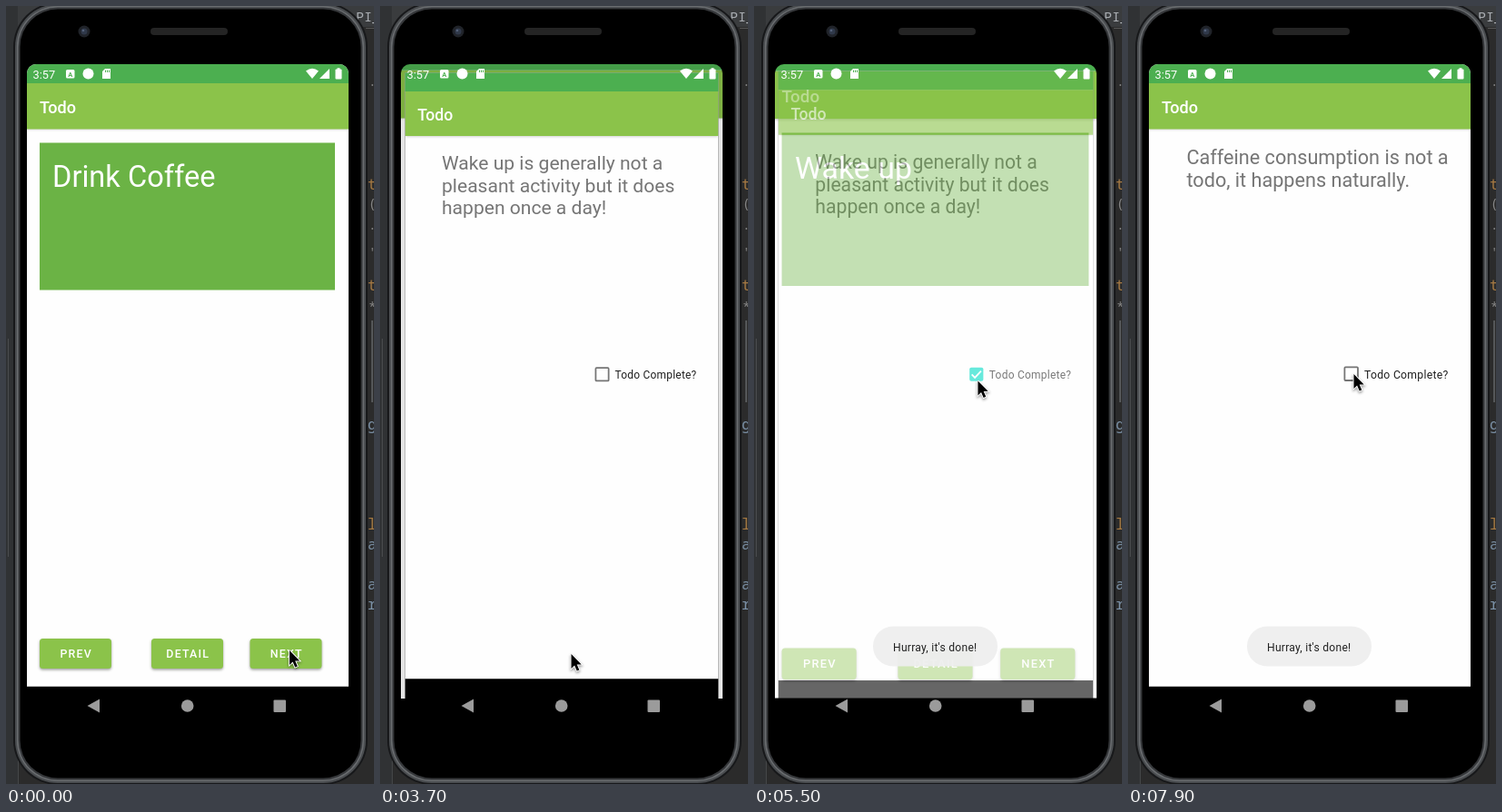
An HTML page with a canvas for the animation above (8000 ms loop, 405 px wide and 856 px high).

```html
<!DOCTYPE html>
<html lang="en">
<head>
<meta charset="utf-8">
<title>Todo app</title>
<style>
html, body { margin: 0; width: 100%; height: 100%; overflow: hidden; background: #2b2b2b; }
canvas { display: block; width: 405px; height: 856px; }
</style>
</head>
<body>
<canvas width="405" height="856"></canvas>
<script>
const LOOP = 8000, STEP = 100, OPEN_MS = 400;
const CENTER = [200, 427];
const BUTTONS = [['PREV', 37], ['DETAIL', 160], ['NEXT', 268.5]];
const TODOS = [[0, 'Drink Coffee'], [300, 'Eat Breakfast'], [800, 'Do Homework'],
  [1400, 'Go to sleep'], [2000, 'Wake up'], [6300, 'Drink Coffee']];
const WAKE = ['Wake up is generally not a', 'pleasant activity but it does', 'happen once a day!'];
const COFFEE = ['Caffeine consumption is not a', 'todo, it happens naturally.'];
// start, button index, hold time
const PRESSES = [[100, 2, 300], [800, 2, 100], [1400, 2, 100], [2000, 2, 200],
  [3300, 1, 200], [6200, 2, 200], [7200, 1, 100]];
// start, true when the detail page opens
const TRANSITIONS = [[3585, true], [5445, false], [7300, true]];
const CHECK_AT = 5100, BACK_END = 5900;
const POINTER = [[0, 312, 709], [2700, 312, 709], [2800, 299, 711], [2900, 299, 711],
  [3300, 210.5, 713], [3900, 210.5, 713], [4700, 243.5, 399], [5400, 243.5, 399],
  [6200, 312, 711], [6500, 312, 711], [6800, 264.5, 712], [7000, 211, 718],
  [7400, 211, 718], [7900, 248.5, 405], [8000, 248.5, 405]];

const canvas = document.querySelector('canvas');
const sheet = canvas.cloneNode();
let ctx = canvas.getContext('2d');
const clamp = v => Math.max(0, Math.min(1, v));
const mix = (a, b, p) => a + (b - a) * p;
const latest = (list, t) => list.filter(item => item[0] <= t).pop();

function cubic(a, b, c, d, u) {
  const v = 1 - u;
  return a * v * v * v + 3 * b * v * v * u + 3 * c * v * u * u + d * u * u * u;
}

// Two-part curve: quick start, very slow settle
function settle(x) {
  const [xs, ys] = x < 1 / 6
    ? [[0, .05, .1333, 1 / 6], [0, 0, .06, .4]]
    : [[1 / 6, .2083, .25, 1], [.4, .82, 1, 1]];
  let lo = 0, hi = 1;
  for (let i = 0; i < 20; i++) {
    const mid = (lo + hi) / 2;
    if (cubic(...xs, mid) < x) lo = mid; else hi = mid;
  }
  return cubic(...ys, lo);
}

function group(draw) {
  ctx.save();
  draw();
  ctx.restore();
}

function rect(x, y, w, h, color, r = 0) {
  ctx.fillStyle = color;
  ctx.beginPath();
  ctx.roundRect(x, y, w, h, r);
  ctx.fill();
}

function disc(x, y, r, color) {
  ctx.fillStyle = color;
  ctx.beginPath();
  ctx.arc(x, y, r, 0, 7);
  ctx.fill();
}

function shape(color, ...points) {
  ctx.fillStyle = color;
  ctx.beginPath();
  points.forEach(p => ctx.lineTo(...p));
  ctx.closePath();
  ctx.fill();
}

function line(color, width, ...points) {
  ctx.strokeStyle = color;
  ctx.lineWidth = width;
  ctx.beginPath();
  points.forEach(p => ctx.lineTo(...p));
  ctx.stroke();
}

function text(str, x, y, size, color, { weight = 400, spacing = 0, align = 'left', family = 'Roboto, sans-serif' } = {}) {
  ctx.font = `${weight} ${size}px ${family}`;
  ctx.letterSpacing = spacing + 'px';
  ctx.textAlign = align;
  ctx.fillStyle = color;
  ctx.fillText(str, x, y);
}

function shadow(alpha, blur, dy) {
  ctx.shadowColor = `rgba(0,0,0,${alpha})`;
  ctx.shadowBlur = blur;
  ctx.shadowOffsetY = dy;
}

function backdrop() {
  rect(0, 0, 405, 856, '#2b2b2b');
  rect(0, 0, 405, 23, '#3a3c3e');
  rect(0, 0, 13, 856, '#303234');
  line('#4b4d4f', 1, [2.5, 366], [2.5, 606]);
  line('#454749', 1, [13.5, 800], [13.5, 856]);
  line('#555', 1, [396, 24.5], [405, 24.5]);
  line('#555759', 2, [403, 346], [403, 436]);
  const code = { family: '"Noto Sans Mono", monospace' };
  text('PI_', 385, 17, 15, '#a9adb2', code);
  [['t', 202], ['t', 313], ['l', 576]].forEach(([c, y]) => text(c, 398, y, 16, '#a67a43', code));
  [['a', 598], ['a', 642], ['g', 466], ['r', 664]].forEach(([c, y]) => text(c, 398, y, 16, '#7c92a8', code));
  [['(', 222], ['.', 246], ["'", 276], ['*', 336], ['.', 88]].forEach(([c, y]) => text(c, 399, y, 14, '#888', code));
}

function phone() {
  // Metal rim: inset and colour of each ring
  [[0, '#17181a'], [2, '#4a4d50'], [4, '#6a6d70'], [5.5, '#36383b'], [7.5, '#000']].forEach(([d, color]) =>
    rect(8 + d, -4 + d, 390 - 2 * d, 861 - 2 * d, color, 49 - d));
  rect(159, 24, 85, 8, '#242424', 4);
  disc(86, 28, 6.5, '#202329');
  disc(86, 28, 3.5, '#30394a');
  disc(85, 27, 1.3, '#536078');
}

function chrome() {
  rect(23, 64, 354, 726, '#000');
  rect(23, 64, 354, 684.7, '#fefefe');
  group(() => {
    ctx.beginPath();
    ctx.rect(23, 64, 354, 684);
    ctx.clip();
    shadow(.25, 3, .8);
    rect(23, 85, 354, 50.5, '#8bc34a');
  });
  rect(23, 64, 354, 21, '#4caf50');
  text('Todo', 37, 118, 18.1, '#fff', { weight: 500 });
}

function button([label, x], index, t) {
  const press = latest(PRESSES, t);
  const [start, target, hold] = press || [0, -1, 0];
  const age = t - start;
  const glow = target === index ? clamp(1 - (age - hold) / 200) : 0;
  group(() => {
    shadow(mix(.38, .45, glow), mix(3, 8, glow), mix(1.5, 4, glow));
    rect(x, 696, 79, 33, '#8bc34a', 3.5);
  });
  if (glow) group(() => {
    ctx.beginPath();
    ctx.roundRect(x, 696, 79, 33, 3.5);
    ctx.clip();
    disc(x + 43, 714, 40 + age * .3, `rgba(255,255,255,${.24 * glow})`);
  });
  text(label, x + 40.2, 717, 12.4, '#fff', { weight: 500, spacing: 1.2, align: 'center' });
}

function home(t) {
  chrome();
  rect(37, 150.5, 325, 162, '#6bb345');
  text(latest(TODOS, t)[1], 51, 199, 32.6, '#fff');
  BUTTONS.forEach((b, i) => button(b, i, t));
}

function detail(t) {
  chrome();
  const lines = t < 7000 ? WAKE : COFFEE;
  lines.forEach((s, i) => text(s, 64.5, 173.5 + i * 25.2, 21.63, '#757575'));
  const age = t - CHECK_AT;
  if (age >= 0 && t < BACK_END) {
    disc(245.5, 404.5, 17, `rgba(0,0,0,${.12 * clamp(1 - (age - 100) / 200)})`);
    rect(238, 397, 15.5, 15.5, '#03dac5', 2);
    if (age > 0) line('#fff', 1.8, [240.5, 405], [244, 408.5], [251, 401]);
  } else {
    ctx.strokeStyle = '#757575';
    ctx.lineWidth = 1.8;
    ctx.beginPath();
    ctx.roundRect(238.4, 397.4, 14.6, 14.6, 1);
    ctx.stroke();
  }
  text('Todo Complete?', 260, 409.5, 12.2, '#1f1f1f', { spacing: .28 });
}

// Paints a page on its own sheet, so that it fades as a whole
function layer(page, t, scale, alpha = 1) {
  const main = ctx;
  ctx = sheet.getContext('2d');
  ctx.clearRect(0, 0, 405, 856);
  group(() => {
    ctx.translate(...CENTER);
    ctx.scale(scale, scale);
    ctx.translate(-CENTER[0], -CENTER[1]);
    page(t);
  });
  ctx = main;
  group(() => {
    ctx.globalAlpha = alpha;
    ctx.drawImage(sheet, 0, 0);
  });
}

function pages(t) {
  const [start, opening] = latest(TRANSITIONS, t) || [-OPEN_MS, false];
  const age = t - start;
  if (age >= OPEN_MS) return (opening ? detail : home)(t);
  const p = settle(age / OPEN_MS), fade = clamp((age - 35) / 50);
  if (opening) {
    layer(home, t, mix(1, 1.05, p));
    rect(23, 64, 354, 726, 'rgba(0,0,0,.1)');
    layer(detail, t, mix(.85, 1, p), fade);
  } else {
    layer(home, t, mix(1.05, 1, p));
    layer(detail, t, mix(1, .9, p), 1 - fade);
  }
}

function statusIcons() {
  const w = '#fff';
  text('3:57', 29.5, 79.5, 12.8, w);
  rect(66, 70, 9.5, 9.5, w, 1.5);
  text('A', 70.8, 77.6, 7.5, '#4caf50', { weight: 700, align: 'center' });
  disc(90.5, 74.5, 6, w);
  shape(w, [109, 69], [115, 69], [115, 80], [106, 80], [106, 72]);
  [109, 111, 113].forEach(x => rect(x, 70.5, 1, 2.5, '#4caf50'));
  ctx.fillStyle = w;
  ctx.beginPath();
  ctx.moveTo(337, 80);
  ctx.lineTo(330, 71.5);
  ctx.quadraticCurveTo(337, 66, 344, 71.5);
  ctx.fill();
  shape(w, [345, 80], [356, 80], [356, 69]);
  rect(362.5, 69.5, 7, 11, w, 1);
  rect(364.5, 68.3, 3, 2, w);
}

function navIcons() {
  const g = '#9b9b9b';
  shape(g, [89.5, 770], [103, 762.5], [103, 777.5]);
  disc(199.7, 770, 6.8, g);
  rect(294.5, 763.5, 13.5, 13.5, g, 1);
}

function toast(t) {
  if (t < CHECK_AT) return;
  group(() => {
    const shown = clamp(.1 + (t - CHECK_AT) / 400);
    ctx.globalAlpha = shown;
    rect(131, 682.5, 137, 44, 'rgba(238,238,238,.94)', 22);
    text("Hurray, it's done!", 153, 709.7, 12.1, '#222', { spacing: .25 });
  });
}

function pointer(t) {
  const i = POINTER.findIndex(k => k[0] > t);
  const [t0, x0, y0] = POINTER[i - 1], [t1, x1, y1] = POINTER[i];
  const p = (t - t0) / (t1 - t0), e = p * p * (3 - 2 * p);
  group(() => {
    ctx.translate(mix(x0, x1, e), mix(y0, y1, e));
    const arrow = [[0, 0], [0, 16], [3.6, 12.6], [6.2, 18.6], [8.8, 17.4], [6.2, 11.6], [11.2, 11.4]];
    group(() => {
      shadow(.45, 3, 1.5);
      line('#fff', 1.8, ...arrow, [0, 0]);
    });
    shape('#000', ...arrow);
  });
}

function draw(t) {
  backdrop();
  phone();
  group(() => {
    ctx.beginPath();
    ctx.roundRect(23, 64, 354, 726, [10, 10, 0, 0]);
    ctx.clip();
    pages(t);
    statusIcons();
    navIcons();
    toast(t);
  });
  pointer(t);
}

function tick() {
  const t = performance.now() % LOOP;
  draw(Math.floor(t / STEP) * STEP);
  requestAnimationFrame(tick);
}
tick();
</script>
</body>
</html>
```
